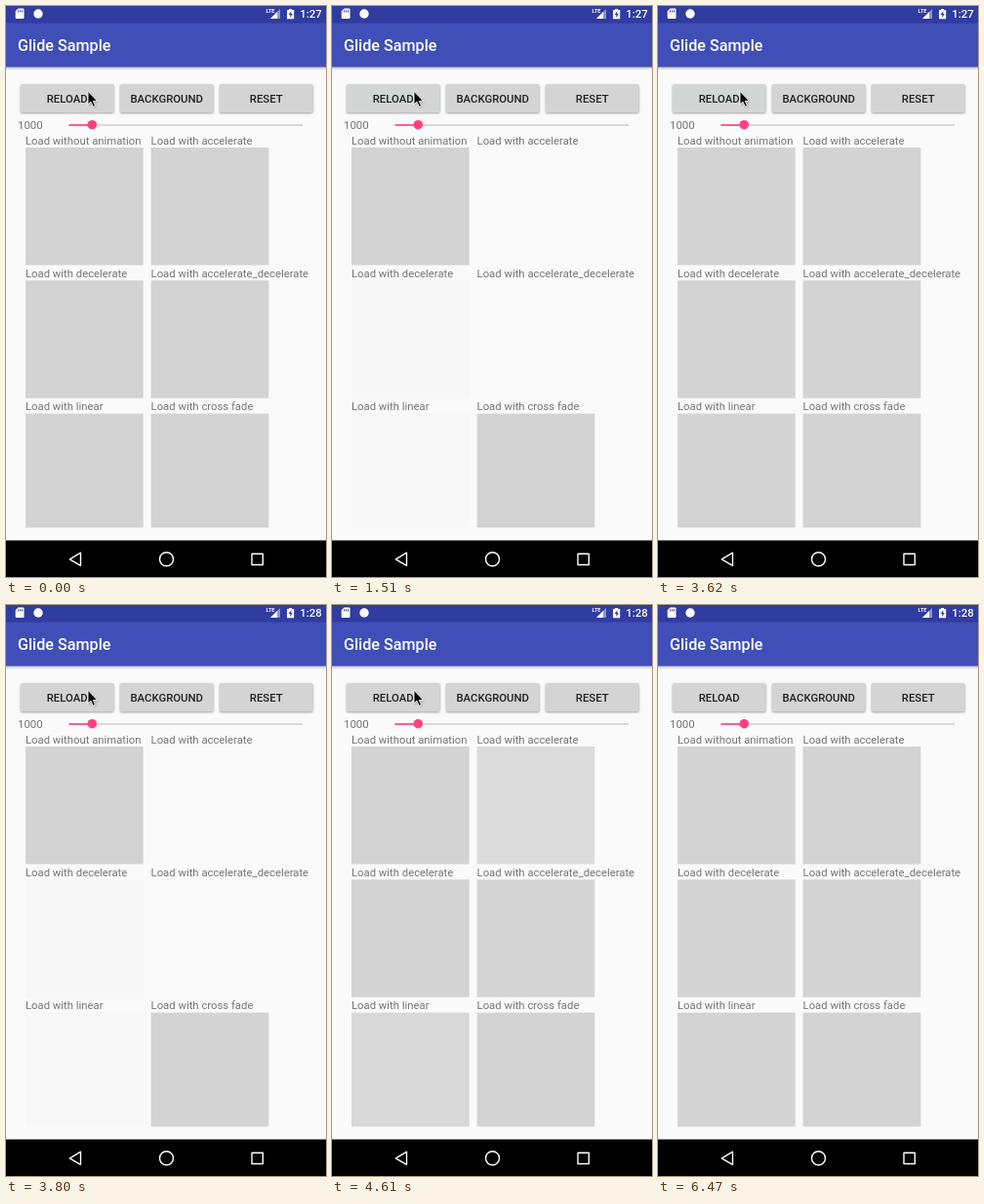
Recreate the animation shown at these times as an HTML page. Size 328 by 585 pixels, loop 6660 ms.

```html
<!DOCTYPE html>
<html lang="en">
<head>
<meta charset="utf-8">
<title>Glide Sample</title>
<style>
  html, body { margin: 0; width: 100%; height: 100%; overflow: hidden; background: #fafafa; }
  svg { display: block; width: 328px; height: 585px; font-family: Roboto, "Noto Sans", sans-serif; }
  .label { font-size: 11.3px; fill: #757575; }
  .caption { font-size: 11.35px; font-weight: 500; fill: #212121; text-anchor: middle; }
</style>
</head>
<body>
<svg viewBox="0 0 328 585" xmlns="http://www.w3.org/2000/svg">
  <defs>
    <linearGradient id="shade" x2="0" y2="1">
      <stop offset="0" stop-color="#000" stop-opacity=".25"/>
      <stop offset="1" stop-color="#000" stop-opacity="0"/>
    </linearGradient>
    <filter id="soft" x="-10%" y="-30%" width="120%" height="160%">
      <feGaussianBlur stdDeviation=".9"/>
    </filter>
  </defs>
  <rect width="328" height="585" fill="#fafafa"/>

  <!-- app bar -->
  <rect y="62" width="328" height="4" fill="url(#shade)"/>
  <rect width="328" height="62.5" fill="#3f4fb7"/>
  <text x="12" y="46" font-size="16.15" font-weight="500" fill="#fff">Glide Sample</text>

  <!-- status bar -->
  <rect width="328" height="17.5" fill="#303c9f"/>
  <path d="M12.5 2.5H17.5Q18.5 2.5 18.5 3.5V12Q18.5 13 17.5 13H10.7Q9.7 13 9.7 12V5.3Z" fill="#fff"/>
  <path d="M12.6 4.3V6.5M14.6 4.3V6.5M16.6 4.3V6.5" stroke="#303c9f"/>
  <circle cx="33" cy="8" r="4.7" fill="#fff"/>
  <path d="M281 3V13H271Z" fill="#8f96cb"/>
  <path d="M278 6V13H271Z" fill="#fff"/>
  <text x="266.5" y="7" font-size="5.5" font-weight="700" fill="#fff">LTE</text>
  <path d="M288 4H290V3H293V4H295.2V13.2H288Z" fill="#fff"/>
  <path d="M292.3 5.2L289.6 9H291.3V12L293.8 8H292.3Z" fill="#303c9f"/>
  <text id="clock" x="301.3" y="12.1" font-size="11.4" font-weight="500" fill="#fff">1:27</text>

  <g id="buttons"></g>

  <!-- duration slider -->
  <text class="label" x="12" y="126" style="font-size:11.45px">1000</text>
  <path d="M88 122H304" stroke="#cdcdcd" stroke-width="1.6"/>
  <path d="M64.5 122H88" stroke="#ff4081" stroke-width="1.7"/>
  <circle cx="88.3" cy="121.7" r="4.8" fill="#ff4081"/>

  <g id="tiles"></g>

  <!-- navigation bar -->
  <rect y="547.5" width="328" height="38" fill="#000"/>
  <g fill="none" stroke="#fff" stroke-width="1.4" stroke-linejoin="round">
    <path d="M76.5 560.2V573.4L65.3 566.8Z"/>
    <circle cx="164.5" cy="566.8" r="7"/>
    <rect x="252" y="561.2" width="11.3" height="11.3"/>
  </g>

  <g id="cursor">
    <path d="M1 1.5V15L4 12.2L6.2 17L8.4 16L6.2 11.5H10.5Z" fill="#000" opacity=".3" filter="url(#soft)"/>
    <path d="M0 0V13.6L3 10.8L5.3 16L7.6 15L5.3 10.1H9.6Z" fill="#000" stroke="#fff" stroke-width=".9"/>
  </g>
</svg>
<script>
const LOOP = 6660;
const byId = id => document.getElementById(id);

function add(parent, tag, attrs, text = '') {
  const el = document.createElementNS('http://www.w3.org/2000/svg', tag);
  for (const key in attrs) el.setAttribute(key, attrs[key]);
  el.textContent = text;
  parent.append(el);
  return el;
}

// Last row whose time has been reached; the time is its first entry.
const at = (rows, t) => rows.findLast(row => row[0] <= t);

const buttons = ['RELOAD', 'BACKGROUND', 'RESET'].map((name, i) => {
  const g = byId('buttons'), x = 15 + i * 102;
  const box = { x, y: 80, width: 95.5, height: 29, rx: 1.6 };
  const shadow = add(g, 'rect', { ...box, y: 81, fill: '#000', opacity: .36, filter: 'url(#soft)' });
  const face = add(g, 'rect', { ...box, fill: '#d4d4d4' });
  const ripple = add(g, 'rect', { ...box, opacity: 0 });
  add(g, 'text', { x: x + 47.7, y: 99, class: 'caption' }, name);
  return { shadow, face, ripple };
});

// Fade curve of each tile, in reading order.
const tiles = [
  ['without animation', () => 1],
  ['with accelerate', p => p * p],
  ['with decelerate', p => 1 - (1 - p) ** 2],
  ['with accelerate_decelerate', p => (1 - Math.cos(Math.PI * p)) / 2],
  ['with linear', p => p],
  ['with cross fade', () => 1],
].map(([name, ease], i) => {
  const g = byId('tiles'), row = i >> 1, y = 145 + row * 136.3;
  const x = i % 2 ? 148.6 : 20;
  add(g, 'text', { x, y: 142 + row * 136, class: 'label' }, 'Load ' + name);
  const rect = add(g, 'rect', { x, y, width: 120.7, height: row < 2 ? 120.5 : 116.8, fill: '#d3d3d3' });
  return { rect, ease };
});

// time, fade progress
const fade = [
  [0, 1], [1510, .055], [1770, .33], [2030, .615], [2370, .96], [3080, 1],
  [3800, .05], [4250, .5], [4610, .86], [5150, 1],
];

// time, shadow drop, ripple strength, face colour
const press = [
  [0, 1, 0, '#d4d4d4'], [710, 2, 0, '#d4d4d4'], [890, 2.2, .1, '#d4d6d6'],
  [980, 1, .02, '#d4d6d6'], [1330, 1, 0, '#d4d6d6'],
  [3080, 2, .02, '#d4d6d6'], [3170, 2.2, .1, '#d4d6d6'], [3260, 1, .02, '#d4d6d6'],
  [3620, 1, 0, '#d4d6d6'], [3800, 1, 0, '#d4d4d4'],
];

// time, x, y of the pointer tip
const path = [
  [0, 84, 87.3], [5150, 88, 94], [5240, 100, 115], [5330, 121, 154], [5420, 149, 208],
  [5500, 179, 270], [5590, 206, 333], [5680, 229, 396], [5770, 246, 451.5],
  [5860, 256, 496], [5950, 262, 530], [6030, 266.5, 554.5],
  [6210, 269, 561], [6300, 273, 569], [6380, 279, 578], [6470, 290, 600],
];

function draw(t) {
  const [, p] = at(fade, t);
  for (const { rect, ease } of tiles) rect.setAttribute('opacity', ease(p));

  const [, drop, strength, color] = at(press, t);
  const { shadow, face, ripple } = buttons[0];
  shadow.setAttribute('y', 80 + drop);
  ripple.setAttribute('opacity', strength);
  face.setAttribute('fill', color);

  const [, x, y] = at(path, t);
  byId('cursor').setAttribute('transform', `translate(${x} ${y})`);
  byId('clock').textContent = t < 3800 ? '1:27' : '1:28';
}

const start = performance.now();
function tick() {
  draw((performance.now() - start) % LOOP);
  requestAnimationFrame(tick);
}
tick();
</script>
</body>
</html>
```
